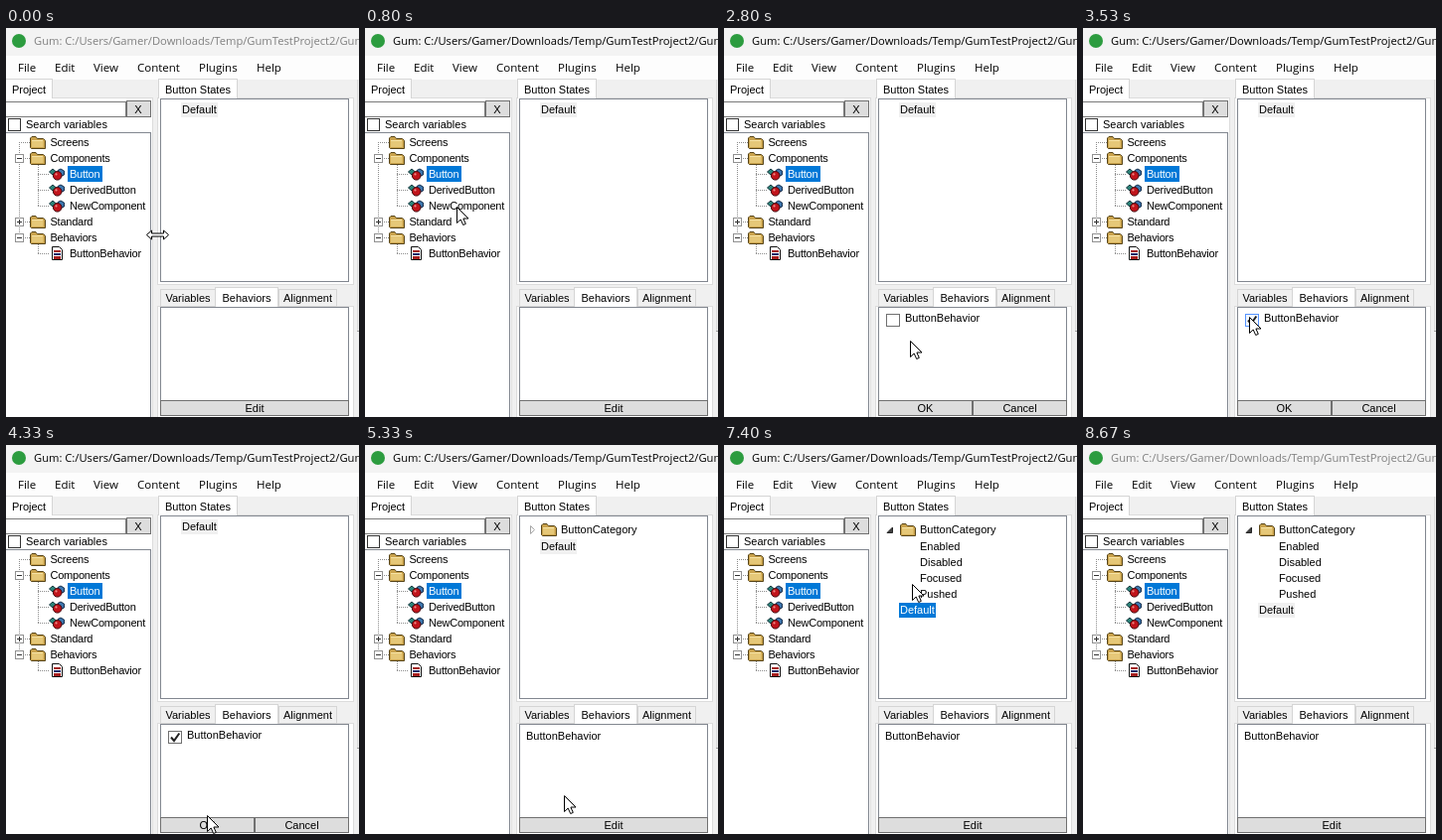
Animation, 355 px wide and 392 px high, one loop 8800 ms. Source, as an HTML page:

```html
<!DOCTYPE html>
<html lang="en">
<head>
<meta charset="utf-8">
<title>Adding a behavior</title>
<style>
  html, body { margin: 0; width: 100%; height: 100%; overflow: hidden; background: #f0f0f0; }
  svg { display: block; width: 355px; height: 392px; }
  text { font: 11px "Liberation Sans", Arial, sans-serif; white-space: pre; }
  .ui { font-family: "Open Sans", "Noto Sans", sans-serif; font-size: 11.5px; }
  .title { font-size: 11.2px; }
  .tree { letter-spacing: -.24px; }
  rect, .crisp { shape-rendering: crispEdges; }
</style>
</head>
<body>
<svg id="stage" viewBox="0 0 355 392" xmlns="http://www.w3.org/2000/svg"></svg>
<script>
const LOOP = 8800, FRAME = 200 / 3;

// ---- drawing helpers ----
const fill = (x, y, w, h, color) =>
  `<rect x="${x}" y="${y}" width="${w}" height="${h}" fill="${color}"/>`;
const box = (x, y, w, h, color, edge) =>
  `<rect x="${x + .5}" y="${y + .5}" width="${w - 1}" height="${h - 1}" fill="${color}" stroke="${edge}"/>`;
const label = (x, y, str, color = '#000', cls = '', anchor = 'start') =>
  `<text x="${x}" y="${y}" fill="${color}" class="${cls}" text-anchor="${anchor}">${str}</text>`;
const path = (d, color, edge = 'none', extra = '') =>
  `<path d="${d}" fill="${color}" stroke="${edge}" ${extra}/>`;
const at = (x, y, inner) => `<g transform="translate(${x} ${y})">${inner}</g>`;

const folder = (x, y) => at(x, y,
  path('M.5 11.5V2L2 .5H6L7.5 2.5H13.5L15.5 4.5V12.5H1.5Z', '#c9a24c', '#57451a') +
  path('M2 4.5H13.5V11H2Z', '#e6c878') +
  path('M2 4.5H13', 'none', '#f6e3a6'));

const component = (x, y) => at(x, y,
  path('M.5 5L4 2L7.5 5L4 8Z', '#2b8378', '#12343c') +
  path('M9 3.5L12 2L15.5 4V8L12 9.5L9 8Z', '#3d76ad', '#16304f') +
  '<circle cx="8.7" cy="8.8" r="4.3" fill="#c0141b" stroke="#3f070b"/>' +
  '<circle cx="7.5" cy="7.4" r="1.1" fill="#f08a86"/>');

const documentIcon = (x, y) => at(x, y,
  path('M.5 .5H7.5L10.5 3.5V13.5H.5Z', '#fff', '#111') +
  fill(2, 4, 7, 2, '#a51d1d') + fill(2, 7, 7, 2, '#1b2468') + fill(2, 10, 7, 3, '#a51d1d'));

const plusMinus = (y, collapsed) =>
  box(9, y - 4, 9, 9, '#fff', '#919191') + fill(11, y, 5, 1, '#333') +
  (collapsed ? fill(13, y - 2, 1, 5, '#333') : '');

const tab = (x, y, w, h, str, active) =>
  box(x, y, w, h, active ? '#fff' : '#f0f0f0', '#d5d5d5') +
  (active ? fill(x + 1, y + h - 1, w - 2, 2, '#fff') : '') +
  label(x + w / 2, y + h - 5, str, '#000', '', 'middle');

const BUTTON_COLORS = {
  normal: ['#ddd', '#707070'], hover: ['#bee6fd', '#3c7fb1'], pressed: ['#c4e5f6', '#2c628b']
};
const button = (x, w, str, state) =>
  box(x, 375, w, 16, ...BUTTON_COLORS[state]) +
  label(x + w / 2, 387, str, '#000', '', 'middle');

// ---- fixed parts of the window ----
function treePanel() {
  const dots = d => path(d, 'none', '#8c8c8c', 'stroke-dasharray="1 1" class="crisp"');
  const rows = ['Screens', 'Components', 'Button', 'DerivedButton', 'NewComponent',
    'Standard', 'Behaviors', 'ButtonBehavior'];
  let out = box(-1, 105, 147, 288, '#fff', '#828790') +
    dots('M13.5 115V211') + dots('M32.5 138V179') + dots('M32.5 218V227');
  rows.forEach((name, i) => {
    const y = 115 + i * 16, child = i > 1 && i < 5 || i === 7, x = child ? 64 : 44.5;
    out += dots(child ? `M32 ${y + .5}H44` : `M13 ${y + .5}H24`);
    if (!child) out += folder(24, y - 6);
    else out += i === 7 ? documentIcon(46, y - 7) : component(43, y - 7);
    if (i === 2) out += fill(62, y - 8, 35, 16, '#0078d7');
    out += label(x, y + 4, name, i === 2 ? '#fff' : '#000', 'tree');
  });
  return out + plusMinus(131) + plusMinus(195, true) + plusMinus(211);
}

function windowFrame() {
  const menus = [['File', 12], ['Edit', 49], ['View', 88], ['Content', 132], ['Plugins', 194], ['Help', 252]];
  return fill(0, 0, 355, 392, '#f0f0f0') + fill(0, 0, 355, 28, '#f3f3f3') +
    fill(0, 28, 355, 24, '#fdfdfd') +
    '<circle cx="13" cy="13" r="7" fill="#2c9c3f"/>' +
    menus.map(([name, x]) => label(x, 44, name, '#000', 'ui')).join('') +
    box(-1, 70, 149, 330, '#fff', '#dcdcdc') + tab(-1, 51, 48, 20, 'Project', true) +
    box(-1, 74, 122, 16, '#fff', '#7a7a7a') + box(121, 73, 25, 17, ...BUTTON_COLORS.normal) +
    label(133, 86, 'X', '#000', '', 'middle') +
    box(2, 91, 13, 13, '#fff', '#333') + label(20, 101, 'Search variables') +
    treePanel() +
    box(152, 70, 198, 189, '#fff', '#dcdcdc') + tab(153, 51, 80, 20, 'Button States', true) +
    box(155, 71, 190, 185, '#fff', '#828790') +
    box(152, 280, 198, 120, '#fff', '#dcdcdc') +
    tab(155, 263, 56, 18, 'Variables') + tab(274, 263, 59, 18, 'Alignment') +
    tab(210, 261, 64, 20, 'Behaviors', true) +
    box(155, 281, 190, 95, '#fff', '#828790') +
    fill(353, 52, 1, 253, '#dcdcdc') + fill(353, 305, 2, 1, '#a0a0a0');
}

// ---- pointer ----
// Each key is [time, x, y]; equal neighbours are rests.
const KEYS = [
  [0, 152, 208], [400, 67, 142], [600, 67, 142], [1000, 135, 245], [1533, 219, 371],
  [1667, 221, 378], [1800, 222, 380], [2400, 222, 380], [2800, 188, 316], [3267, 168, 292],
  [3733, 168, 292], [4333, 203, 374], [4533, 203, 380], [5200, 203, 380],
  [5667, 186, 205], [6067, 167, 94], [6333, 167, 87], [6667, 167, 87],
  [6870, 228, 69], [7070, 283, 105], [7250, 232, 163], [7400, 190, 141], [7600, 182, 88],
  [7667, 182, 85], [7800, 182, 85], [8067, 65, 365], [8800, 65, 365]
];

function slope(i, axis) {
  const a = KEYS[i - 1], b = KEYS[i], c = KEYS[i + 1];
  if (!a || !c) return 0;
  const before = (b[axis] - a[axis]) / (b[0] - a[0]);
  const after = (c[axis] - b[axis]) / (c[0] - b[0]);
  return before * after <= 0 ? 0 : 2 * before * after / (before + after);
}

function pointerAt(t) {
  let i = KEYS.findIndex(key => key[0] > t) - 1;
  if (i < 0) i = KEYS.length - 2;
  const a = KEYS[i], b = KEYS[i + 1], span = b[0] - a[0], u = (t - a[0]) / span;
  return [1, 2].map(axis => {
    const ease = u * u * (3 - 2 * u);
    const v = a[axis] + (b[axis] - a[axis]) * ease +
      span * u * (1 - u) * ((1 - u) * slope(i, axis) - u * slope(i + 1, axis));
    return Math.round(v);
  });
}

const ARROW = 'M.5 .5V16.5L4.2 13L6.7 18.5L9.3 17.4L6.9 12H12Z';
const RESIZE = 'M-11 0L-6 -4.5V-1.5H6V-4.5L11 0L6 4.5V1.5H-6V4.5Z';

function pointer(t, x, y) {
  if (t >= 8130) return '';
  return t < 60
    ? at(x + .5, y + .5, path(RESIZE, '#fff', '#000'))
    : at(x - 1, y - 1, path(ARROW, '#fff', '#000'));
}

// ---- changing parts ----
function stateTree(t, x, y) {
  const hasCategory = t >= 4996, open = t >= 6463, focused = open && t < 8663;
  const over = x >= 163 && x < 176 && y >= 78 && y < 92;
  const middle = open ? 166 : hasCategory ? 102 : 82;
  let out = fill(176, middle - 7, 37, 15, focused ? '#0078d7' : '#f0f0f0') +
    label(177, middle + 4, 'Default', focused ? '#fff' : '#000');
  if (!hasCategory) return out;
  out += folder(177, 79) + label(197, 89, 'ButtonCategory');
  if (open) {
    out += path('M164 88.5H169.5V83Z', over ? '#cceefb' : '#404040', over ? '#1cc4f7' : '#262626');
    ['Enabled', 'Disabled', 'Focused', 'Pushed'].forEach((name, i) => {
      out += label(197, 106 + i * 16, name);
    });
  } else {
    out += path('M166.5 81.5L170.5 85.5L166.5 89.5Z', '#fff', over ? '#27c7f7' : '#a5a5a5');
  }
  return out;
}

function behaviors(t, x, y) {
  const editing = t >= 2130 && t < 4996;
  const state = (left, right, down, up) =>
    t >= down && t < up ? 'pressed' : y >= 375 && x >= left && x < right ? 'hover' : 'normal';
  if (!editing) {
    return (t >= 4996 ? label(162, 297, 'ButtonBehavior') : '') +
      button(155, 190, 'Edit', state(155, 345, 1996, 2130));
  }
  const over = x >= 163 && x < 177 && y >= 288 && y < 302, down = t >= 3396 && t < 3530;
  return box(163, 288, 14, 13, down ? '#d9ecff' : over ? '#f3f9ff' : '#fff',
      down ? '#3c77dd' : over ? '#5593ff' : '#707070') +
    (t >= 3530 ? path('M166 294.5L169 298L174.3 290.5', 'none', '#212121', 'stroke-width="2"') : '') +
    label(182, 296, 'ButtonBehavior') +
    button(155, 95, 'OK', state(155, 250, 4730, 4996)) +
    button(250, 95, 'Cancel', state(250, 345, LOOP, LOOP));
}

const stage = document.getElementById('stage');
stage.innerHTML = windowFrame() + '<g id="live"></g>';
const live = document.getElementById('live');

function render(time) {
  const t = Math.floor((time % LOOP + 4) / FRAME) * FRAME;
  const [x, y] = pointerAt(t);
  const active = t >= 663 && t < 8663;
  live.innerHTML =
    label(28, 17, 'Gum: C:/Users/Gamer/Downloads/Temp/GumTestProject2/GumTest', active ? '#000' : '#808080', 'ui title') +
    stateTree(t, x, y) + behaviors(t, x, y) + pointer(t, x, y);
}

const start = performance.now();
function tick() {
  render(performance.now() - start);
  requestAnimationFrame(tick);
}
tick();
</script>
</body>
</html>
```
